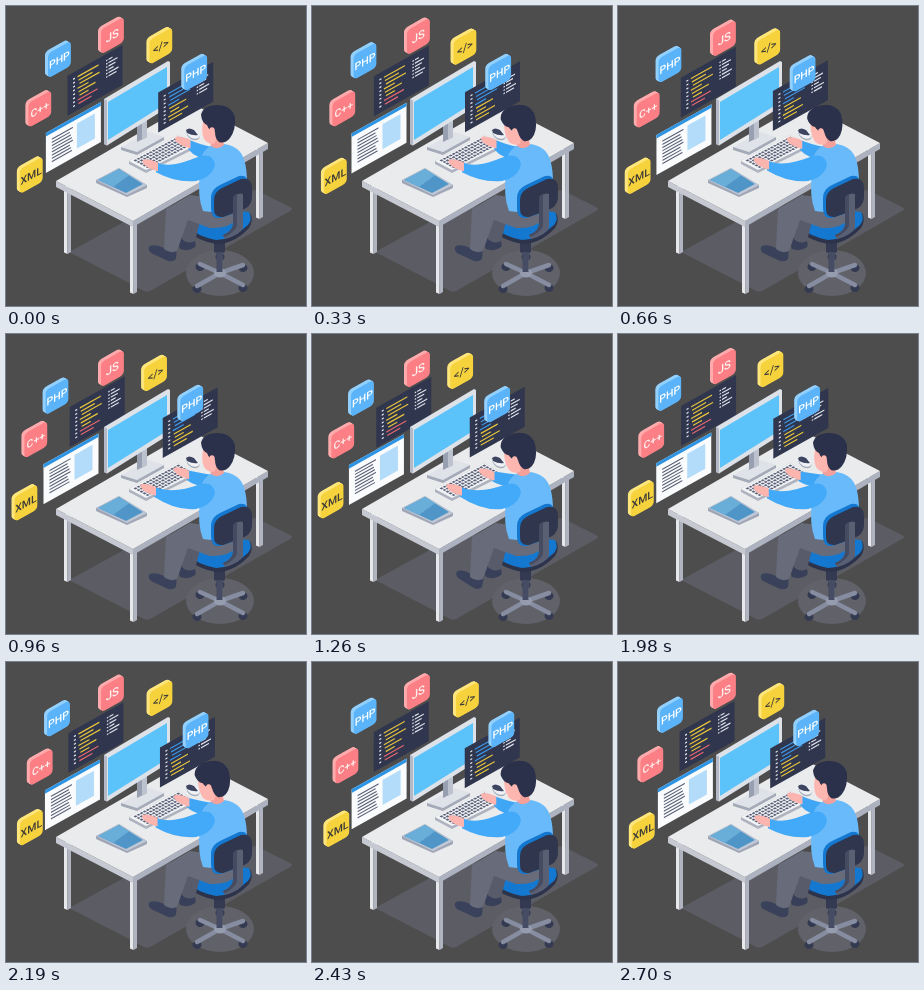
Recreate the animation shown at these times as an HTML page. Size 300x300 px, loop 2760 ms.

```html
<!DOCTYPE html>
<html lang="en">
<head>
<meta charset="utf-8">
<title>Programmer at a desk</title>
<style>
html, body { margin: 0; width: 100%; height: 100%; overflow: hidden; background: #4d4d4d; }
svg { display: block; width: 100vw; height: 100vh; }
text { font-family: Roboto, "Open Sans", sans-serif; font-weight: 500; text-anchor: middle; }
</style>
</head>
<body>
<svg viewBox="0 0 300 300">
  <!-- floor shadows -->
  <path d="M63 246L138 205L250 184L284 201Q288 203 284 205L146 284Q141 287 136 284L127 279Z" fill="#5b5c64"/>
  <ellipse cx="214" cy="267" rx="34" ry="23" fill="#606169"/>

  <!-- desk -->
  <g id="legs"></g>
  <path d="M50 175L127 215V221L50 181Z" fill="#c6c9d2"/>
  <path d="M127 215L262 137V143L127 221Z" fill="#adb2c0"/>
  <path d="M50 175L185 97L262 137L127 215Z" fill="#eaebed"/>

  <g id="panelLeft"></g>

  <!-- monitor -->
  <path d="M115 141L143 126L158 131L131 146Z" fill="#dfe2e8"/>
  <path d="M115 141L131 146L158 131V134L131 149L115 144Z" fill="#a4aab8"/>
  <path d="M131 119L141 113V131L131 136Z" fill="#989fb1"/>
  <path d="M136 116L141 113V131L136 134Z" fill="#bcc2ce"/>
  <path d="M98 93L162 55L164 56V100L101 139.500L98 138Z" fill="#dde1e8"/>
  <path d="M98 93L101 94.500V139.500L98 138Z" fill="#b3b9c7"/>
  <path d="M102 96L161 61V97L102 134Z" fill="#5bc3fa"/>

  <!-- tablet -->
  <path d="M90 174L113 162L141 179V182L121 191L90 177Z" fill="#a0a6b5"/>
  <path d="M90 174L113 162L141 179L121 189Z" fill="#c0c8d6"/>
  <path d="M92 174L113 163L137 178L120 187Z" fill="#4f95c8"/>
  <path d="M92 174L113 163L123 169.300L107 181Z" fill="#69aed8"/>

  <!-- keyboard and mouse -->
  <path d="M123 155L172 129L190 139V142L140 167L123 158Z" fill="#aeb3bf"/>
  <path d="M123 155L172 129L190 139L140 164Z" fill="#f3f4f6"/>
  <g id="keys" fill="#5a6078"></g>
  <ellipse cx="187" cy="129" rx="7" ry="4.500" transform="rotate(30 187 129)" fill="#a6adba"/>
  <ellipse cx="187" cy="127.500" rx="7" ry="4.500" transform="rotate(30 187 127.500)" fill="#f0f2f5"/>
  <path d="M180 124Q183 121 188 124L192 129Q187 130 181 127Z" fill="#3d4560"/>

  <g id="panelRight"></g>
  <g id="doc"></g>
  <g id="tiles"></g>

  <!-- chair foot -->
  <g id="star"></g>
  <path d="M208 230H219V246Q213.500 249 208 246Z" fill="#333a52"/>
  <path d="M210.500 246H216.500V266H210.500Z" fill="#454c63"/>

  <!-- seat -->
  <path d="M182 219Q205 226 244 207Q248 214 243 222Q228 238 210 238Q190 234 182 225Z" fill="#2d334b"/>
  <path d="M182 215L225 204L243 206Q247 213 242 219Q226 234 210 234Q190 230 182 220Z" fill="#1478d0"/>

  <!-- legs and shoes -->
  <path d="M174 230Q180 227 186 231Q191 236 189 241Q183 246 174 243Q171 237 174 230Z" fill="#383f58"/>
  <path d="M176 200L198 200L189 235Q182 239 176 233Z" fill="#575b6a"/>
  <path id="shoe" d="M171 240L170 253Q166 257 160 254L145 247Q141 243 144 240Q150 238 158 242Z" fill="#3a415b"/>
  <path d="M160 203L184 189L226 195L234 212Q222 223 204 222L182 214L171 245Q164 248 158 243Z" fill="#686c7a"/>

  <!-- person -->
  <g id="armRight"><path fill="#3fa6f5"/><path fill="#fbb5ae"/></g>
  <path d="M204 140Q220 135 231 143Q241 150 241 177L239 196Q222 209 197 205Q191 190 194 166Q192 148 204 140Z" fill="#69bafb"/>
  <g id="armLeft"><path fill="#42aaf8"/><path fill="#fbb5ae"/></g>
  <path d="M203 130L216 130L218 139Q212 145 205 140Z" fill="#f3a09b"/>
  <g id="head">
    <path d="M197 116Q195 126 198 133Q201 138 208 138L215 126L208 112Z" fill="#fdb6b0"/>
    <path d="M195 109Q197 99 211 99Q225 99 229 111Q230 124 224 132Q219 138 213 136Q209 133 209 126Q203 125 201 119Q196 117 195 109Z" fill="#2b314a"/>
    <ellipse cx="206" cy="125" rx="2.800" ry="3.800" fill="#fdb6b0"/>
  </g>

  <!-- chair back -->
  <path d="M205 192Q205 183 214 179L233 170Q242 168 242 178V194Q241 203 232 206L214 212Q205 213 205 202Z" fill="#1478d0"/>
  <path d="M208 194Q208 186 216 182L235 173Q246 171 246 182V192Q245 201 236 204L217 211Q208 212 208 203Z" fill="#2f364e"/>
  <path d="M227 191Q232 186 237 188V222Q234 229 219 233L217 229Q227 225 227 218Z" fill="#5a6073"/>
  <path d="M227 191Q229 188 231 188V220Q228 227 218 231L217 229Q227 225 227 218Z" fill="#454b60"/>
</svg>
<script>
const $ = id => document.getElementById(id);
const TAU = Math.PI * 2, STEP = 30, LOOP = 2760, LAST = 90;
const wave = (p, peak) => Math.cos(TAU * (p - peak));
const clamp = v => Math.max(-1, Math.min(1, v));
const bar = (x, y, w, h, fill) => `<rect x="${x}" y="${y}" width="${w}" height="${h}" fill="${fill}"/>`;
const skew = body => `<g transform="matrix(1 -.56 0 1 0 0)">${body}</g>`;

// Desk legs
$('legs').innerHTML = [[58, 180, 247], [124, 217, 287], [250, 143, 212]].map(([x, a, b]) =>
  `<path d="M${x} ${a}h3.500v${b - a + 1}l-3.500 -1.500z" fill="#e6e8ec"/>` +
  `<path d="M${x + 3.5} ${a}h3.500v${b - a - 1}l-3.500 2z" fill="#b0b4c0"/>`).join('');

// Keyboard rows
let keys = '';
for (let r = 0; r < 5; r++)
  for (let c = 0; c < 15; c++) {
    const x = 127.5 + c * 3.05 + r * 3, y = 154.4 - c * 1.62 + r * 1.65;
    keys += `<path d="M${x} ${y}l2.100 -1.100l2 1.050l-2.100 1.100z"/>`;
  }
$('keys').innerHTML = keys;

// Five-armed chair base
$('star').innerHTML = [[191, 283], [237, 282], [237, 262], [194, 261], [214, 251]].map(([x, y]) =>
  `<ellipse cx="${x}" cy="${y}" rx="4.500" ry="4" fill="#333a52"/>` +
  `<path d="M214 267L${x} ${y - 3}" stroke="#868da0" stroke-width="4.500" stroke-linecap="round"/>`).join('') +
  '<ellipse cx="214" cy="267" rx="6" ry="4.500" fill="#959cae"/>';

// Code windows
function codePanel(colors) {
  const white = '#e3e6ee';
  let s = bar(0, 0, 55, 40, '#30364e');
  [21, 14, 20, 11, 17, 9, 20, 13].forEach((w, i) => {
    const y = 6 + i * 3.9;
    s += bar(5.5, y, 2, 1.4, white) + bar(10 + i % 3, y, w, 1.3, colors[i >> 1]);
    if (i < 6) s += bar(38.5, 6 + i * 3.3, 1.5, 1.3, white) + bar(41, 6 + i * 3.3, 4 + (i * 5) % 7, 1.3, white);
  });
  return skew(s);
}
const yellow = '#ecc93b', red = '#ec6a70', blue = '#3c9bec';
$('panelLeft').innerHTML = codePanel([yellow, yellow, yellow, red]);
$('panelRight').innerHTML = codePanel([blue, blue, yellow, yellow]);

// Document window
let page = bar(0, 0, 55, 40, '#fafbfc') + bar(0, 0, 55, 3.6, '#2d94e4') + bar(31, 8, 18, 25, '#b3dbfa');
for (let i = 0; i < 8; i++) page += bar(6, 9 + i * 3.2, 21 - (i * 7 % 4), 1.2, '#555b72');
$('doc').innerHTML = skew(page);

// Floating tiles: label, size, face, edge, ink, x, y, x swing, x peak, y swing, y peak
const tiles = [
  ['PHP', 10.5, '#5bb4f9', '#93d0fd', '#ffffff', 37.5, 51.2, 1.5, 0, 5.5, 0.5],
  ['JS', 11.5, '#fb7f84', '#ffabad', '#fff0ef', 92, 24.8, 0, 0, 3, 0.5],
  ['</>', 11, '#f6d23c', '#ffe67c', '#3d3b38', 138, 30.7, 3, 0.9, 3, 0.17],
  ['PHP', 10.5, '#5bb4f9', '#93d0fd', '#ffffff', 174, 61.2, 2.7, 0.83, 2.4, 0.56],
  ['C++', 10.5, '#fb7f84', '#ffabad', '#fff0ef', 18.1, 97.4, 2.7, 0.83, 2.4, 0.57],
  ['XML', 10.5, '#f6d23c', '#ffe67c', '#3d3b38', 8.4, 160, 3, 0.9, 3, 0.17],
];
const esc = s => s.replace('<', '&lt;').replace('>', '&gt;');
$('tiles').innerHTML = tiles.map(([label, size, face, edge, ink]) => {
  const slab = (d, fill) => `<g transform="translate(${d} ${d * .58})">` +
    skew(`<rect width="22.800" height="25" rx="4" fill="${fill}"/>`) + '</g>';
  let s = '';
  for (let d = 0; d < 3; d += .5) s += slab(d, edge);
  return `<g>${s}${slab(3, face)}<g transform="translate(3 1.700)">` +
    skew(`<text x="11.400" y="16.500" font-size="${size}" fill="${ink}">${esc(label)}</text>`) + '</g></g>';
}).join('');

const move = (el, x, y) => el.setAttribute('transform', `translate(${x.toFixed(2)} ${y.toFixed(2)})`);
const setPaths = (id, ...ds) => ds.forEach((d, i) => $(id).children[i].setAttribute('d', d));
const hand = (x, y) => `M${x + 2} ${y - 4.5}Q${x - 4} ${y - 8} ${x - 12} ${y - 8}` +
  `Q${x - 15} ${y - 6} ${x - 12} ${y - 3}Q${x - 9} ${y + 1} ${x + 2} ${y + 4}Z`;

function draw(p) {
  [...$('tiles').children].forEach((el, i) => {
    const [x, y, ax, px, ay, py] = tiles[i].slice(5);
    move(el, x + ax * wave(p, px), y + ay * wave(p, py));
  });
  const c = wave(p, 0);
  move($('panelLeft'), 62.9 - 1.4 * c, 71.7 - 2 * c);
  move($('panelRight'), 155 - 2.8 * c, 85 + 1.6 * c);
  move($('doc'), 38.4 + 1.5 * c, 129 - 2.1 * c);

  const tilt = 6.5 * (clamp(2.4 * wave(3 * p, .04)) - 1);
  $('head').setAttribute('transform', `rotate(${tilt.toFixed(2)} 209 139)`);

  const lift = clamp(-1.6 * c), drop = clamp(-1.6 * wave(p, .07));
  const lx = 149 - lift, ly = 159.5 - 1.8 * lift;
  setPaths('armLeft',
    `M${lx} ${ly - 5}C${lx + 14} ${ly + 1} 178 156 192 151Q206 146 209 158Q207 171 190 175Q170 177 ${lx} ${ly + 5}Z`,
    hand(lx, ly));
  const rx = 181.5 - drop, ry = 140.5 + 2 * drop;
  setPaths('armRight',
    `M${rx} ${ry - 5}Q195 139 206 141L205 153Q190 153 ${rx} ${ry + 5}Z`,
    hand(rx, ry));

  const tap = Math.max(0, 1 - Math.abs(p - .467) / .1);
  $('shoe').setAttribute('transform', `rotate(${(8 * tap * tap * (3 - 2 * tap)).toFixed(2)} 168 252)`);
}

function tick() {
  const step = Math.min(LAST, Math.floor(performance.now() % LOOP / STEP));
  draw(step / LAST);
  requestAnimationFrame(tick);
}
tick();
</script>
</body>
</html>
```
